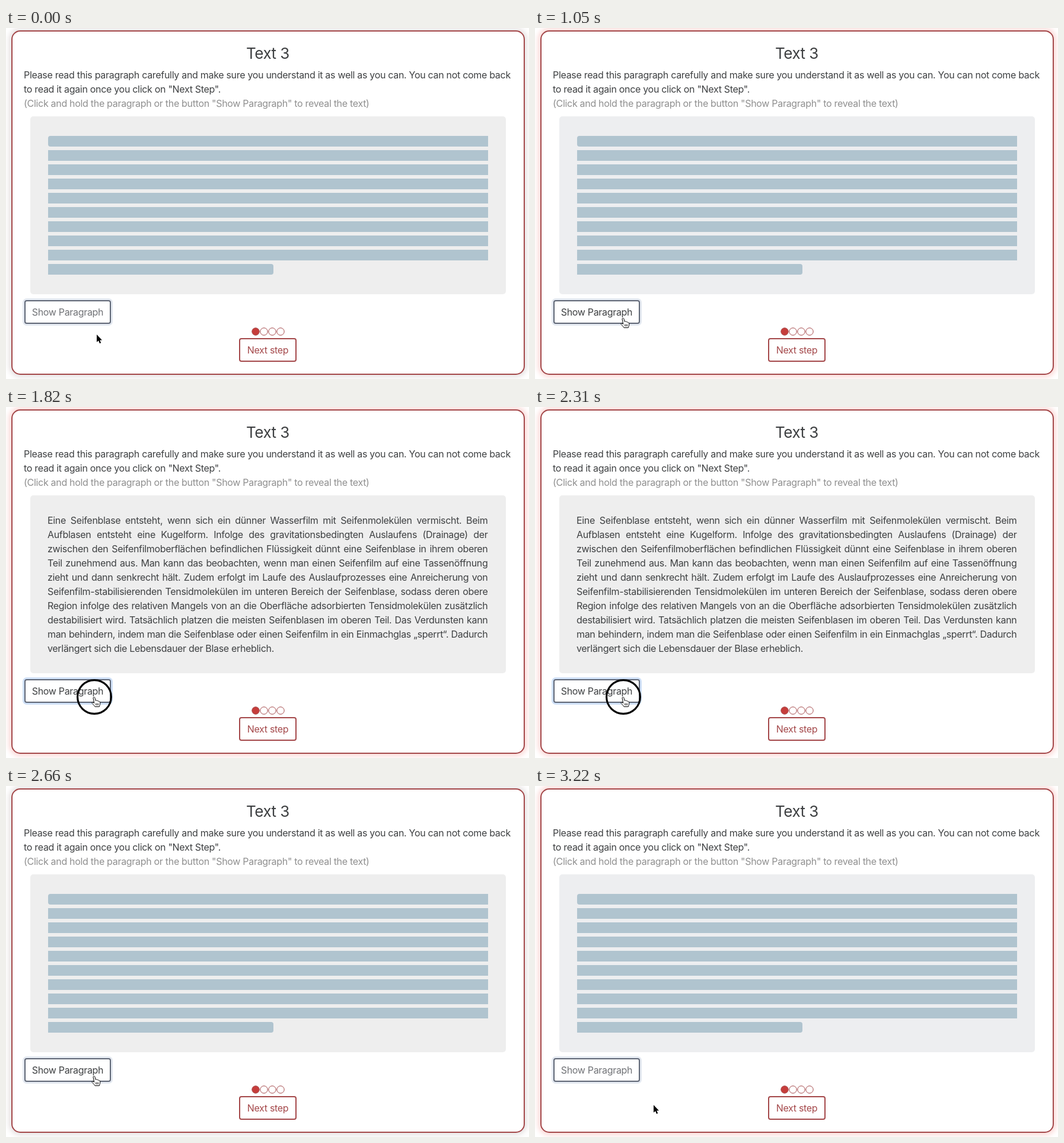
Recreate the animation shown at these times as an HTML page. Size 882x592 px, loop 3290 ms.

```html
<!DOCTYPE html>
<html lang="en">
<head>
<meta charset="utf-8">
<title>Text 3</title>
<style>
  html, body { margin: 0; width: 882px; height: 592px; overflow: hidden; background: #fff; }
  #stage {
    position: relative; width: 882px; height: 592px; overflow: hidden;
    font: 16px/24px Inter, "Open Sans", sans-serif; letter-spacing: -.02em; color: #3e4042;
    --glow: #e6e2e2; --panel: #eee; --ring: #e3e8f0;
  }
  #stage * { box-sizing: border-box; }
  #stage > * { position: absolute; white-space: nowrap; }
  .card {
    left: 9px; top: 4px; width: 866px; height: 581px; background: #fff;
    border: 2px solid #a4484a; border-radius: 15px; box-shadow: 0 0 9px 4px var(--glow);
  }
  h1 {
    left: 0; top: 27px; width: 883px; margin: 0; text-align: center;
    font: 26px/32px Inter, "Open Sans", sans-serif; letter-spacing: -.02em;
  }
  .intro { left: 30px; top: 67px; letter-spacing: -.019em; }
  .hint { color: #8f8f8f; }
  .panel { left: 41px; top: 149px; width: 802px; height: 300px; border-radius: 5px; background: var(--panel); }
  #text { left: 70px; top: 179px; width: 742.5px; }
  #text div { height: 24px; text-align-last: justify; }
  #text div:last-child { text-align-last: left; }
  #bars { left: 71px; top: 182px; width: 742px; }
  #bars div { height: 18px; margin-bottom: 6px; background: #b0c4cf; }
  #bars div:first-child { border-radius: 4px 0 0 4px; }
  #bars div:last-child { width: 380px; border-radius: 0 4px 4px 0; }
  .button {
    height: 40px; line-height: 36px; text-align: center; background: #fff;
    border: 2px solid; border-radius: 4px;
  }
  #show { left: 31px; top: 459px; width: 146px; border-color: #5f6675; box-shadow: 0 0 0 3px var(--ring); }
  .next { left: 393px; top: 523px; width: 97px; color: #a4484a; }
  svg { left: 0; top: 0; }
</style>
</head>
<body>
<div id="stage">
  <div class="card"></div>
  <h1>Text 3</h1>
  <div class="intro">
    Please read this paragraph carefully and make sure you understand it as well as you can. You can not come back<br>
    to read it again once you click on "Next Step".<br>
    <span class="hint">(Click and hold the paragraph or the button "Show Paragraph" to reveal the text)</span>
  </div>
  <div class="panel"></div>
  <div id="bars"></div>
  <div id="text" lang="de"></div>
  <div id="show" class="button">Show Paragraph</div>
  <div class="button next">Next step</div>
  <svg width="882" height="592" fill="none">
    <g stroke="#a4484a">
      <circle cx="421" cy="512" r="6.2" fill="#c63d3b"/>
      <circle cx="435" cy="512" r="6.2"/>
      <circle cx="449" cy="512" r="6.2"/>
      <circle cx="463" cy="512" r="6.2"/>
    </g>
    <circle id="press" cx="149" cy="489" r="28.4" stroke="#000" stroke-width="3.1"/>
    <g id="cursor">
      <path id="arrow" fill="#000" stroke="#fff" stroke-width="1.4" paint-order="stroke"
        d="M0 0V12.8L3 10.2 5 15 7.2 14 5.2 9.4H9Z"/>
      <g id="hand" stroke="#000" stroke-linejoin="round" stroke-linecap="round">
        <path fill="#fff" d="M-2 1.5C-2 .2 .6 0 .9 1.4L2 6.2C2.8 5.4 4.6 5.6 5 6.8 5.8 6.2 7.2 6.6 7.5 7.8 8.4 7.4 9.6 8 9.7 9.4 9.9 11.5 9.2 14 8.3 16.5H1C-.4 14.4-2 12.3-3.6 11-4.6 9.9-3.2 8.6-1.8 9.4L-.6 10.2Z"/>
        <path stroke-width=".8" d="M2.6 11v3M4.6 11v3M6.6 11v3"/>
      </g>
    </g>
  </svg>
</div>
<script>
const LOOP = 3290, TICK = 70;
const PRESS = 1120, RELEASE = 2590, HIDE = 2660;
const $ = id => document.getElementById(id);

const lines = [
  "Eine Seifenblase entsteht, wenn sich ein dünner Wasserfilm mit Seifenmolekülen vermischt. Beim",
  "Aufblasen entsteht eine Kugelform. Infolge des gravitationsbedingten Auslaufens (Drainage) der",
  "zwischen den Seifenfilmoberflächen befindlichen Flüssigkeit dünnt eine Seifenblase in ihrem oberen",
  "Teil zunehmend aus. Man kann das beobachten, wenn man einen Seifenfilm auf eine Tassenöffnung",
  "zieht und dann senkrecht hält. Zudem erfolgt im Laufe des Auslaufprozesses eine Anreicherung von",
  "Seifenfilm-stabilisierenden Tensidmolekülen im unteren Bereich der Seifenblase, sodass deren obere",
  "Region infolge des relativen Mangels von an die Oberfläche adsorbierten Tensidmolekülen zusätzlich",
  "destabilisiert wird. Tatsächlich platzen die meisten Seifenblasen im oberen Teil. Das Verdunsten kann",
  "man behindern, indem man die Seifenblase oder einen Seifenfilm in ein Einmachglas „sperrt“. Dadurch",
  "verlängert sich die Lebensdauer der Blase erheblich."
];
for (const line of lines) {
  $("text").appendChild(document.createElement("div")).textContent = line;
  $("bars").appendChild(document.createElement("div"));
}

// Cursor path: start time, end time, from, to
const moves = [
  [700, 1050, [153, 517], [149, 489]],
  [2800, 3220, [149, 489], [200, 538]]
];
// Start time, card glow, panel tint
const tones = [
  [0, "#e6e2e2", "#eee"],
  [630, "#fbd9d7", "#edeef0"],
  [PRESS, "#fbd9d7", "#eee"],
  [HIDE, "#e6e2e2", "#eee"],
  [2870, "#fbd9d7", "#edeef0"]
];

const ease = u => u * u * (3 - 2 * u);
const visible = (id, on) => { $(id).style.visibility = on ? "visible" : "hidden"; };

function cursorAt(t) {
  const [from, to, a, b] = moves[t < HIDE ? 0 : 1];
  const u = ease(Math.min(1, Math.max(0, (t - from) / (to - from))));
  return a.map((v, i) => v + (b[i] - v) * u);
}

function draw(time) {
  const t = Math.floor(time / TICK) * TICK;
  const [x, y] = cursorAt(t);
  const hover = y < 499;
  const open = t >= PRESS && t < HIDE;
  const [, glow, panel] = tones.filter(tone => tone[0] <= t).pop();
  const style = $("stage").style;
  style.setProperty("--glow", glow);
  style.setProperty("--panel", panel);
  style.setProperty("--ring", open ? "#cfe0f7" : "#e3e8f0");
  $("show").style.color = hover ? "#3e4042" : "#707276";
  visible("text", open);
  visible("bars", !open);
  visible("press", t >= PRESS && t < RELEASE);
  visible("hand", hover);
  visible("arrow", !hover);
  $("cursor").setAttribute("transform", `translate(${x} ${y})`);
}

const start = performance.now();
function loop() {
  draw((performance.now() - start) % LOOP);
  requestAnimationFrame(loop);
}
loop();
</script>
</body>
</html>
```
